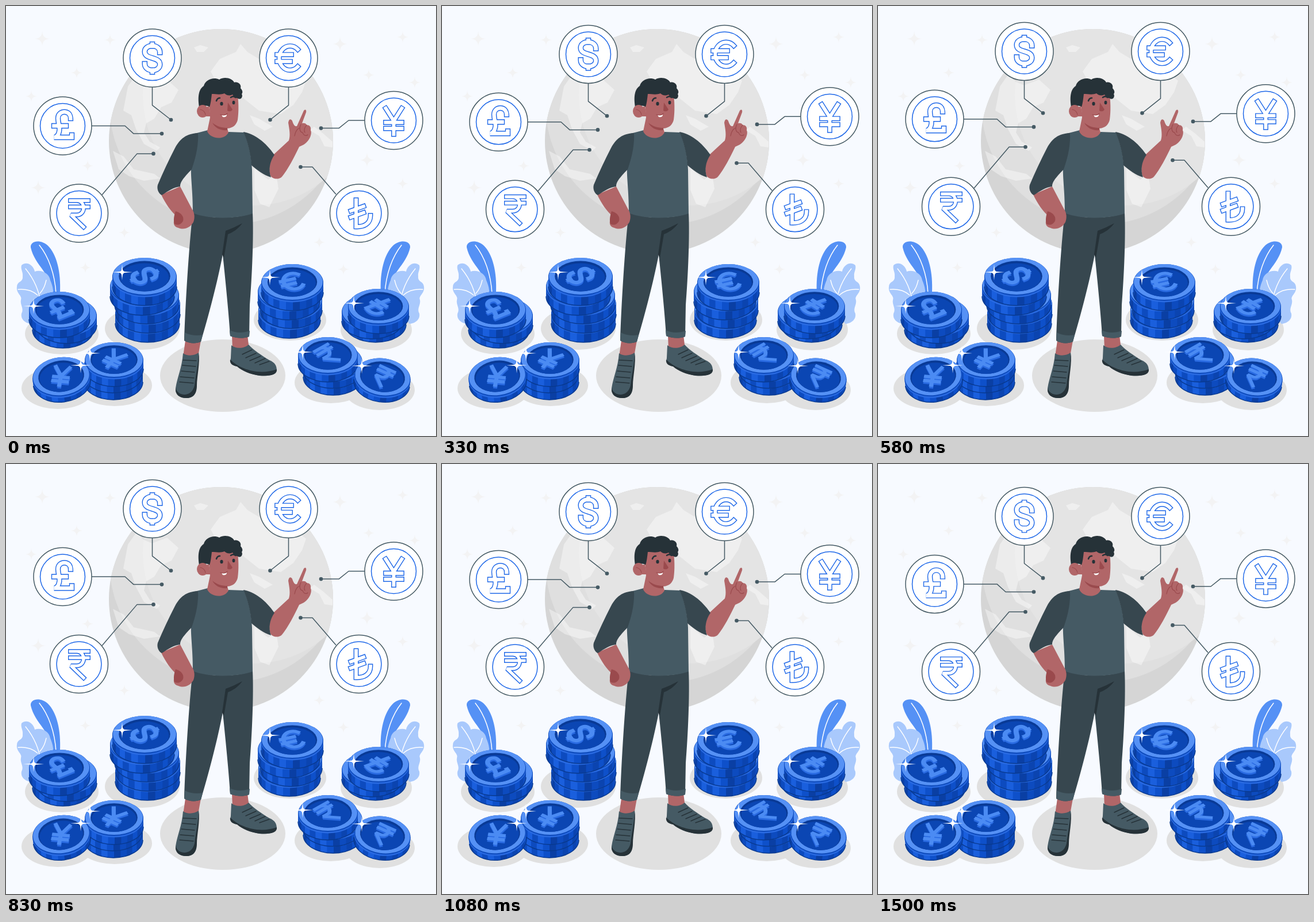
Animation, 748 px wide and 748 px high, one loop 1.54 s. Source, as an HTML page with a canvas:

```html
<!DOCTYPE html>
<html lang="en">
<head>
<meta charset="utf-8">
<title>Currencies of the world</title>
<style>
html, body { margin: 0; width: 100%; height: 100%; overflow: hidden; background: #f7faff; }
canvas { display: block; width: 748px; height: 748px; }
</style>
</head>
<body>
<canvas id="stage"></canvas>
<script>
const SIZE = 748, LOOP = 1540, STEP = 1000 / 24;
const density = Math.max(1, window.devicePixelRatio || 1);
const stage = document.getElementById('stage');

function makeContext(canvas) {
  canvas.width = canvas.height = Math.round(SIZE * density);
  const context = canvas.getContext('2d');
  context.scale(density, density);
  context.lineJoin = 'round';
  return context;
}

let ctx;

function fill(path, color) {
  ctx.fillStyle = color;
  ctx.fill(new Path2D(path));
}

function line(path, color, width, cap = 'round') {
  ctx.strokeStyle = color;
  ctx.lineWidth = width;
  ctx.lineCap = cap;
  ctx.stroke(new Path2D(path));
}

function oval(x, y, rx, ry, color) {
  ctx.beginPath();
  ctx.ellipse(x, y, rx, ry, 0, 0, 7);
  ctx.fillStyle = color;
  ctx.fill();
}

function ring(x, y, r, color, width) {
  ctx.beginPath();
  ctx.arc(x, y, r, 0, 7);
  ctx.strokeStyle = color;
  ctx.lineWidth = width;
  ctx.stroke();
}

function star(x, y, rx, ry, color) {
  ctx.beginPath();
  ctx.moveTo(x, y - ry);
  ctx.quadraticCurveTo(x, y, x + rx, y);
  ctx.quadraticCurveTo(x, y, x, y + ry);
  ctx.quadraticCurveTo(x, y, x - rx, y);
  ctx.quadraticCurveTo(x, y, x, y - ry);
  ctx.fillStyle = color;
  ctx.fill();
}

function glint(x, y) {
  fill(`M${x - 18},${y}L${x},${y - 1.2}L${x + 18},${y}L${x},${y + 1.2}Z`, '#fff');
  fill(`M${x},${y - 14}L${x + 1.2},${y}L${x},${y + 14}L${x - 1.2},${y}Z`, '#fff');
  star(x, y, 9, 9, '#fff');
}

// Centre lines of the signs, drawn around the origin.
const SIGNS = {
  dollar: ['M13.2,-10C13.2,-25 -13.2,-25 -13.2,-11C-13.2,3 13.2,-3 13.2,11C13.2,25 -13.2,25 -13.2,10M0,-24V-21M0,24V21', 8.2],
  euro: ['M16,-15A19,21 0 1 0 16,15M-20,-6H5M-20,6H3', 7.4],
  pound: ['M14,-13C14,-28 -8,-28 -8,-13C-8,-4 -4,2 -6,10C-7,16 -11,20 -15,20H16V16M-15,0H6', 8],
  yen: ['M-14,-21L0,1L14,-21M0,1V24M-14,3.5H14M-14,14H14', 7.4],
  rupee: ['M-15,-22H16M-15,-11H16M-14,-22H-4C12,-22 12,3 -4,3H-14L8,24', 6.6],
  lira: ['M-5,-23V23.5C9,24 20,18 20,4M-14,-4L8,-12M-14,7L8,-1', 7.4]
};

const INK = '#455a64', BLUE = '#1f68e8', SKIN = '#b16668', SKIN_DARK = '#9a4a4d';
const DARK = '#37474f', NIGHT = '#263238', SHADE = '#e0e0e0';

function badge([sign, x, y, wire, dotX, dotY]) {
  line(wire, INK, 1.5, 'butt');
  oval(dotX, dotY, 3.3, 3.3, INK);
  oval(x, y, 50.5, 50.5, '#fff');
  ring(x, y, 50.5, INK, 1.5);
  ring(x, y, 39, BLUE, 1.5);
  const [path, width] = SIGNS[sign];
  ctx.save();
  ctx.translate(x, y);
  ctx.lineJoin = 'miter';
  ctx.miterLimit = 2;
  line(path, BLUE, width + 1.4, 'square');
  line(path, '#fff', width - 1.4, 'square');
  ctx.restore();
}

const BADGES = [
  ['dollar', 254.5, 91, 'M254.5,141V173L287,198.4', 287, 198.4],
  ['euro', 491.5, 91, 'M491.5,141V173L459.5,198.4', 459.5, 198.4],
  ['pound', 98.5, 208.9, 'M149,208.9H207L222,222.5H271', 271, 222.5],
  ['yen', 674.5, 199.4, 'M624,199.4H596L579,213H548', 548, 213],
  ['rupee', 127, 360.9, 'M167,329L228,257.3H256', 256.5, 257.3],
  ['lira', 614, 360.9, 'M574,328L533,280.4H513', 512.5, 280.4]
];

const LAND = [
  'M212,140L226,120L240,132L254,138L280,128L300,146L288,168L270,176L258,196L244,204L240,220L250,236L268,246L262,252L240,240L226,214L218,190L204,182Z',
  'M327,72L338,68L352,72L344,80L332,80Z',
  'M186,252L205,262L222,284L258,292L268,300L240,304L214,296L196,284Z',
  'M356,114L372,92L400,80L408,66L420,80L440,92L470,100L500,112L522,130L515,150L500,172L478,188L440,182L400,150L366,132Z',
  'M424,190L440,196L464,210L450,217L432,206Z',
  'M432,282L456,302L470,292L474,318L458,350L442,344L432,320Z',
  'M528,216L545,226L554,244L568,246L568,236L552,222L536,210Z'
].join('');

function globe() {
  ctx.save();
  ctx.beginPath();
  ctx.arc(374, 235, 195, 0, 7);
  ctx.clip();
  ctx.fillStyle = '#d5d5d5';
  ctx.fillRect(170, 30, 420, 410);
  oval(388, 172, 208, 208, '#dfdfdf');
  oval(430, 155, 192, 192, '#e4e4e4');
  fill(LAND, 'rgba(255,255,255,.38)');
  ctx.restore();
}

function leaves() {
  fill('M43,420C42,407 62,406 73,417C88,432 96,462 94,500H80C80,466 50,452 43,420Z', '#5591f5');
  line('M58,416C74,436 85,466 87,500', '#fff', 1.5);
  fill('M27,451C36,443 48,451 50,462C60,458 75,464 77,477C82,488 84,500 81,512L44,553C34,552 25,545 27,535C32,526 24,520 26,511C29,504 17,500 19,488C20,478 30,481 29,470C30,463 25,458 27,451Z', '#a9c9fc');
  line('M34,457C48,474 58,496 61,520M21,493C32,492 45,494 55,503M70,477C68,485 66,492 59,500', '#fff', 1.4);
}

const FACETS = ['#0b44b0', '#0d4bbf', '#0b44b0', '#0e50ca', '#0b44b0', '#0d4bbf', '#0a3fa4',
  '#0e50ca', '#1a5fdd', '#0d4bbf', '#1a5fdd', '#0d4bbf', '#0a3fa4', '#0d4bbf'];

function sides(rx, ry, h) {
  const slice = Math.PI / FACETS.length;
  FACETS.forEach((color, i) => {
    const from = i * slice - 0.02, to = from + slice + 0.03;
    ctx.beginPath();
    ctx.ellipse(0, 0, rx, ry, 0, from, to);
    ctx.ellipse(0, h, rx, ry, 0, to, from, true);
    ctx.fillStyle = color;
    ctx.fill();
  });
}

function coin(x, y, rx, ry, h, tilt) {
  ctx.save();
  ctx.translate(x, y);
  ctx.rotate(tilt);
  sides(rx, ry, h);
  line(`M${-rx},${h}A${rx},${ry} 0 0 0 ${rx},${h}`, '#08398f', 1.4, 'butt');
  oval(0, 2.5, rx, ry, '#2a6be2');
  oval(0, 0, rx, ry, '#0c49ba');
  oval(0, -1, rx - 1, ry - 1, '#5591f5');
  ctx.restore();
}

function face(sign, turn, x, y, rx, ry, tilt) {
  ctx.save();
  ctx.translate(x, y - 1);
  ctx.rotate(tilt);
  oval(0, 0, rx * 0.8, ry * 0.8, '#093a96');
  oval(0, 2, rx * 0.76, ry * 0.74, '#0b46b3');
  const [path, width] = SIGNS[sign];
  for (const [dy, color] of [[3, '#2a6be2'], [0, '#4b8bf3']]) {
    ctx.save();
    ctx.translate(0, dy - 1);
    ctx.scale(rx / 58, ry / 49);
    ctx.rotate(turn * Math.PI / 180);
    ctx.lineJoin = 'miter';
    ctx.miterLimit = 2;
    line(path, color, width * 1.1, 'square');
    ctx.restore();
  }
  ctx.restore();
}

// Each pile lists its coin centres from the bottom up.
const PILES = [
  ['dollar', 62, 56, 33, 17, 0, [[246, 535], [247, 519], [245, 503], [237, 488], [241, 471]]],
  ['euro', -18, 54, 32, 17, 0, [[493, 529], [496, 512], [492, 497], [498, 481]]],
  ['pound', -30, 53, 32, 16, 0, [[99, 547], [105, 539], [93, 529]]],
  ['lira', 62, 53, 31, 16, 0, [[643, 538], [637, 532], [648, 523]]],
  ['yen', 32, 51, 31, 15, 0, [[187, 639], [186, 627], [188, 616]]],
  ['yen', 15, 50, 34, 10, -0.12, [[96, 645]]],
  ['rupee', -38, 52, 32, 14, 0, [[569, 631], [568, 619], [560, 608]]],
  ['rupee', 20, 49, 33, 10, 0.14, [[655, 646]]]
];

const SHADOWS = [[237, 561, 65, 37], [97, 570, 64, 36], [90, 665, 63, 36], [189, 660, 65, 36],
  [494, 546, 63, 36], [644, 563, 62, 36], [565, 655, 63, 36], [650, 668, 61, 35], [377, 643, 109, 63]];

const GLINTS = [[202, 463], [459, 472], [48, 522], [146, 604], [605, 517], [516, 602], [130, 625], [619, 626]];

const SPARKLES = [[63, 57], [181, 59], [123, 116], [44, 157], [581, 66], [631, 120], [690, 54], [711, 133],
  [56, 316], [142, 278], [138, 455], [206, 394], [628, 268], [690, 309], [545, 411], [587, 458]];

function piles() {
  for (const [sign, turn, rx, ry, h, tilt, coins] of PILES) {
    coins.forEach(([x, y]) => coin(x, y, rx, ry, h, tilt));
    face(sign, turn, ...coins[coins.length - 1], rx, ry, tilt);
  }
  GLINTS.forEach(([x, y]) => glint(x, y));
}

function shoes() {
  fill('M312,582H339L334,610H308ZM393,572H420L423,598H394Z', SKIN);
  fill('M308,604C316,610 328,608 335,603C337,620 331,645 331,660C332,675 325,682 314,682C302,682 294,676 295,665C298,645 306,630 308,604Z', INK);
  fill('M295,665C300,680 323,681 328,660C330,640 335,622 335,603C338,620 332,645 332,660C332,676 325,682 314,682C302,682 294,676 295,665Z', NIGHT);
  line('M308,616L331,617M307,625L330,627M305,635L328,637M303,645L327,647M302,654L326,656', NIGHT, 1.4);
  fill('M392,590C399,597 415,596 422,589C430,598 445,608 458,616C468,620 471,626 471,634C468,643 455,644 440,643C425,640 410,634 402,627C393,625 389,622 391,612Z', INK);
  fill('M390,615C407,632 440,643 471,632C472,641 462,644 442,643C425,641 411,635 402,627C393,625 389,622 390,615Z', NIGHT);
  line('M411,606L428,598M417,612L435,604M424,617L443,609M433,621L451,613M441,624L458,618', NIGHT, 1.4);
}

function legs() {
  fill('M325,358C350,371 400,371 429,360C431,400 428,470 424,520L423,575C412,579 400,578 390,574C388,540 382,480 377,432C368,480 352,540 339,584C330,588 318,587 310,582C312,520 318,420 325,358Z', DARK);
  fill('M311,568C320,573 332,574 342,572L339,584C330,588 318,587 310,582ZM389,564C400,569 412,569 424,565L423,575C412,579 400,578 390,574Z', INK);
  fill('M376,432L382,391C393,387 401,383 411,378C404,388 394,394 386,397L379,438Z', NIGHT);
}

function arms() {
  fill('M270,328C278,345 287,357 296,365C289,376 291,384 300,386C310,390 320,386 326,376C329,368 328,360 324,354L303,314Z', SKIN);
  fill('M295,357C305,360 310,366 308,374C304,381 298,382 293,379C291,373 292,365 295,357Z', SKIN_DARK);
  fill('M334,221C313,222 303,231 294,247C283,268 273,290 264,311C262,318 265,326 271,329C282,322 292,315 303,314C303,306 308,300 323,284C331,262 335,240 334,221Z', DARK);
  fill('M466,258L492,234C495,225 493,215 491,203C492,196 496,196 498,200C500,206 502,210 506,209L518,182C521,179 523,181 522,185L515,204C519,203 522,204 523,207C528,207 531,210 530,216C533,222 528,233 522,238C518,242 513,243 510,245C502,262 490,285 480,297C474,303 463,301 460,295C456,283 459,270 466,258Z', SKIN);
  line('M502,226C503,220 506,214 511,212M513,206C509,214 512,220 516,220C517,225 522,227 525,224M523,207C519,212 518,217 520,220', SKIN_DARK, 1.2);
  fill('M413,219C432,222 452,237 467,259C459,270 456,285 461,298C448,294 436,285 427,277C426,257 420,235 413,219Z', DARK);
}

function torso() {
  fill('M328,222L351,216C356,231 380,233 387,219L414,220C421,237 427,257 428,285L429,361C400,371 350,371 325,360C325,320 321,300 322,278Z', INK);
}

function head() {
  fill('M352,152L402,148C405,165 405,185 403,198C401,206 396,212 385,213L387,220C380,234 356,232 350,218L355,194Z', SKIN);
  fill('M359,203C367,210 376,212 385,212V216C374,217 364,213 359,203Z', SKIN_DARK);
  fill('M338,186C333,164 333,146 344,139C347,128 361,123 371,128C380,122 394,126 397,133C404,131 410,137 408,143C412,147 412,151 410,153C413,158 408,165 402,160C398,161 396,157 394,154C388,157 383,155 380,152C373,155 365,153 358,153C357,162 356,170 354,176C347,170 341,176 338,186Z', NIGHT);
  oval(342, 183, 10, 11, SKIN);
  fill('M344,178L353,174L356,192L348,192Z', SKIN);
  line('M338,180C343,181 346,184 347,189', SKIN_DARK, 1.2);
  oval(375, 170, 2.6, 3.2, NIGHT);
  oval(396, 168, 2.4, 3.2, NIGHT);
  line('M366,165C367,162 369,160 372,160M391,159C394,157 397,157 399,159', NIGHT, 2.6);
  fill('M386,168L394,180C392,184 388,184 385,182Z', SKIN_DARK);
  fill('M375,189.5C378,190 381,190 384,189C384,193 380,194 377,193Z', '#fff');
  line('M373,189C378,190.5 382,190 385,187', SKIN_DARK, 1.2);
}

function paintLayer(...parts) {
  const canvas = document.createElement('canvas');
  ctx = makeContext(canvas);
  parts.forEach(part => part());
  return canvas;
}

function backdrop() {
  ctx.fillStyle = '#f7faff';
  ctx.fillRect(0, 0, SIZE, SIZE);
  SPARKLES.forEach(([x, y], i) => {
    const r = i % 4 === 0 ? 14 : 11;
    star(x, y, r, r, '#f3f3f4');
  });
}

function scenery() {
  SHADOWS.forEach(shadow => oval(...shadow, SHADE));
  leaves();
  ctx.save();
  ctx.translate(746, 0);
  ctx.scale(-1, 1);
  leaves();
  ctx.restore();
}

const back = paintLayer(backdrop, globe);
const front = paintLayer(scenery, piles, shoes, legs, torso, arms, head);
ctx = makeContext(stage);

// A steady rise of 15 px and the same way down, at 24 steps a second.
function liftAt(time) {
  const step = Math.floor((time + 5) / STEP);
  return Math.max(0, 15 - Math.abs(15 - (step + 0.5) * 5 / 6));
}

let start;
function draw(now) {
  start ??= now;
  const lift = liftAt((now - start) % LOOP);
  ctx.drawImage(back, 0, 0, SIZE, SIZE);
  ctx.save();
  ctx.translate(0, -lift);
  BADGES.forEach(badge);
  ctx.restore();
  ctx.drawImage(front, 0, 0, SIZE, SIZE);
  requestAnimationFrame(draw);
}
requestAnimationFrame(draw);
</script>
</body>
</html>
```
